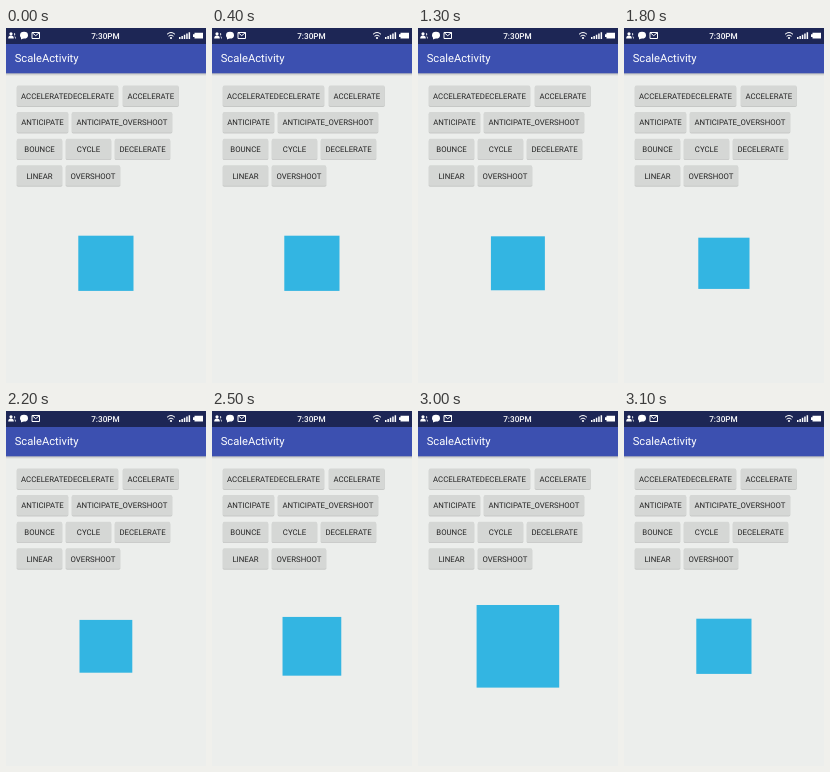
These frames come from a looping animation (200x355 px, 3200 ms). An HTML page:

```html
<!DOCTYPE html>
<html lang="en">
<head>
<meta charset="utf-8">
<title>ScaleActivity</title>
<style>
  html, body { margin: 0; width: 100%; height: 100%; overflow: hidden; background: #eceeec; }
  svg { display: block; width: 200px; height: 355px; }
  text { font-family: Roboto, sans-serif; text-rendering: geometricPrecision; }
  .label { font-size: 7.8px; fill: #222; text-anchor: middle; }
</style>
</head>
<body>
<svg viewBox="0 0 200 355">
  <defs>
    <linearGradient id="shade" x2="0" y2="1">
      <stop stop-color="#000" stop-opacity=".22"/>
      <stop offset="1" stop-color="#000" stop-opacity="0"/>
    </linearGradient>
  </defs>
  <rect width="200" height="355" fill="#eceeec"/>
  <rect y="45" width="200" height="3" fill="url(#shade)"/>
  <rect y="16" width="200" height="29.3" fill="#3c50b0"/>
  <rect width="200" height="16" fill="#1d2655"/>

  <g fill="#fff">
    <!-- contacts, chat, mail -->
    <circle cx="5" cy="5.8" r="1.6"/>
    <path d="M2.2 10.5q0-3 2.8-3t2.8 3z"/>
    <path d="M8 5a1.3 1.3 0 0 1 0 2.6M8.5 8q1.6.5 1.6 2.5h-1" opacity=".8"/>
    <ellipse cx="18" cy="7.2" rx="4" ry="3.4"/>
    <path d="M15 8.5v3l3-1.5z"/>
    <path d="M26 4.5h7.5v6H26zl3.7 3.2 3.8-3.2" fill="none" stroke="#fff"/>
    <text x="99.5" y="10.8" font-size="8.2" font-weight="500" text-anchor="middle">7:30PM</text>
    <!-- wifi, signal, battery -->
    <path d="M161 6.3q4-3.6 8 0M162.5 8.2q2.5-2.2 5 0" fill="none" stroke="#fff"/>
    <circle cx="165" cy="10" r="1.1"/>
    <path d="M173 9h1.5v2H173zM175.4 8h1.5v3h-1.5zM177.8 6.8h1.5V11h-1.5zM180.200 5.500h1.500V11h-1.500zM182.600 4.200h1.500V11h-1.500z"/>
    <path d="M188.500 4.800h8.500v5.600h-8.500zM187 6.300h1.500v2.600H187z"/>
    <text x="8.7" y="34" font-size="11.2">ScaleActivity</text>
  </g>

  <g id="buttons"></g>
  <rect id="box" fill="#33b5e2"/>
  <circle id="touch" cx="18.5" cy="92.7" r="5.5" fill="#fff" fill-opacity=".65" stroke="#bbb" stroke-width=".6"/>
</svg>
<script>
  const LOOP = 3200, STEP = 100;
  const START = 960, DURATION = 2090;
  const BASE = 55.2, GROWTH = 31, CX = 99.9, CY = 235.3;

  // left, top, width, label
  const buttons = [
    [11, 57.5, 101, 'ACCELERATEDECELERATE'], [117, 57.5, 55.5, 'ACCELERATE'],
    [11, 84, 51, 'ANTICIPATE'], [66, 84, 100, 'ANTICIPATE_OVERSHOOT'],
    [11, 110.7, 45, 'BOUNCE'], [60, 110.7, 45, 'CYCLE'], [109, 110.7, 55, 'DECELERATE'],
    [11, 137.3, 45, 'LINEAR'], [60, 137.3, 54, 'OVERSHOOT']
  ];
  const $ = id => document.getElementById(id);

  $('buttons').innerHTML = buttons.map(([x, y, w, label]) => `
    <rect x="${x - .3}" y="${y + .8}" width="${w + .6}" height="20.6" rx="1.4" fill="#000" opacity=".16"/>
    <rect x="${x}" y="${y}" width="${w}" height="20.5" rx="1.2" fill="#d5d7d5"/>
    <text class="label" x="${x + w / 2}" y="${y + 13.2}">${label}</text>`).join('');

  const anticipate = p => p * p * (3 * p - 2);

  function sizeAt(time) {
    const p = (time - START) / DURATION;
    return p > 0 && p < 1 ? BASE + GROWTH * anticipate(p) : BASE;
  }

  function draw(now) {
    // The screen refreshes in whole steps.
    const time = Math.floor(now % LOOP / STEP) * STEP;
    const size = sizeAt(time);
    const box = { x: CX - size / 2, y: CY - size / 2, width: size, height: size };
    for (const key in box) $('box').setAttribute(key, box[key]);
    $('touch').style.display = time === 900 ? '' : 'none';
  }

  let origin;
  function tick(now) {
    origin ??= now;
    draw(now - origin);
    requestAnimationFrame(tick);
  }
  draw(0);
  requestAnimationFrame(tick);
</script>
</body>
</html>
```
